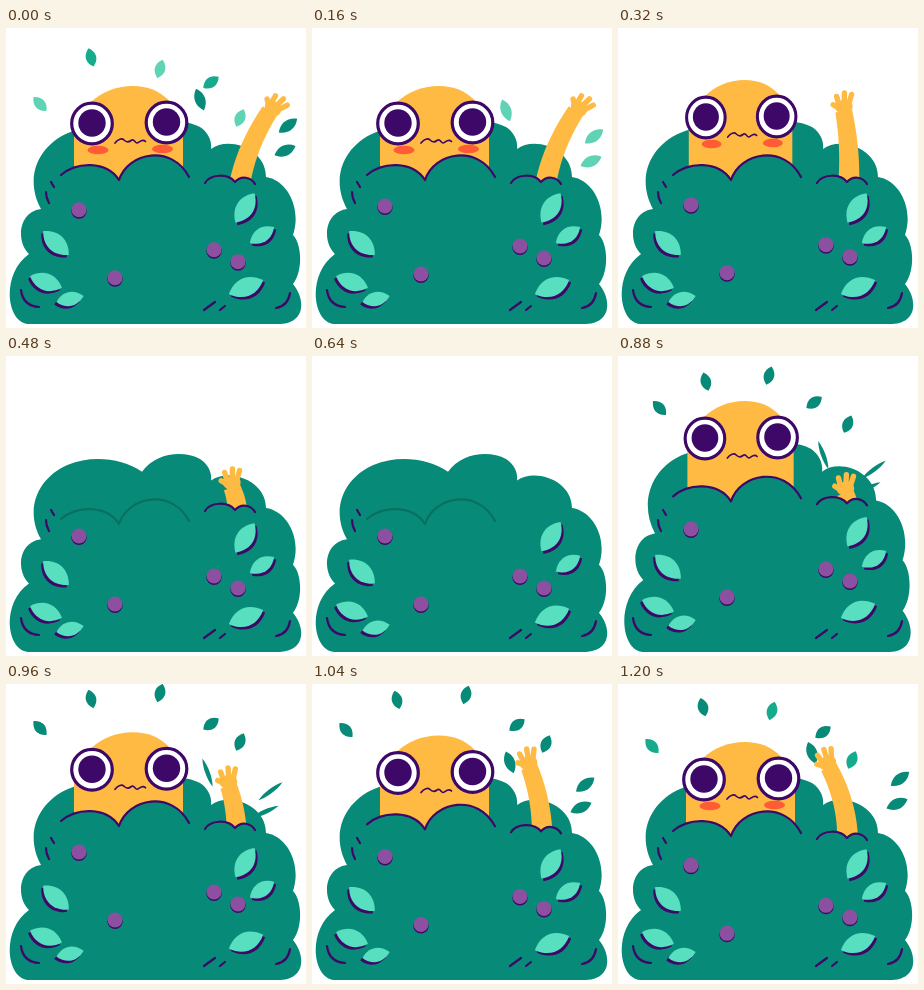
An HTML page that plays this animation: 300x300 px, repeating every 1.28 s.

```html
<!DOCTYPE html>
<html lang="en">
<head>
<meta charset="utf-8">
<title>Peeking from the bush</title>
<style>
html, body { margin: 0; width: 100%; height: 100%; overflow: hidden; background: #fff; }
svg { display: block; width: 100vw; height: 100vh; }
.line { fill: none; stroke: #3d0868; stroke-width: 2.2; stroke-linecap: round; stroke-linejoin: round; }
.green { fill: #088a78; }
.skin { fill: #ffba43; }
.finger { fill: none; stroke: #ffba43; stroke-width: 5.4; stroke-linecap: round; }
</style>
</head>
<body>
<svg viewBox="0 0 300 300">
  <g id="flying"></g>
  <path id="bush" class="green" d="M35 181C18 150 32 118 62 105C85 95 116 98 136 112C150 92 178 90 194 99C203 105 206 114 205 121C222 108 260 120 260 149C281 152 296 180 287 207C296 216 297 243 287 256C300 272 299 295 274 296H22C0 294 -5 246 23 226C10 214 12 184 35 181Z"/>
  <g id="body">
    <path class="skin" d="M68 215V108C70 84 92 58 127 58C156 58 175 78 177 108V215Z"/>
    <g id="cheeks" fill="#ff5b35">
      <ellipse cx="92" cy="122" rx="10.5" ry="4.3"/>
      <ellipse cx="156.5" cy="121" rx="10.5" ry="4.3"/>
    </g>
    <g id="eyes"></g>
    <path class="line" style="stroke-width:1.7" d="M109 115C112 111 116 110 118 112S122 115 125 112.500S129 115 131 115S136 110 139.500 113.500"/>
  </g>
  <g id="arm">
    <path id="limb" class="skin"/>
    <g id="hand">
      <ellipse class="skin" cx="0.500" cy="-4" rx="8.800" ry="7"/>
      <path class="finger" d="M-3 -2L-10 -7M-4 -5L-6 -15M1 -6L2 -18M5 -5L9 -16"/>
    </g>
  </g>
  <g id="fold">
    <path class="green" d="M55 147C70 134 100 132 113 152C122 124 166 116 183 149V275H55Z"/>
    <path id="foldLine" class="line" d="M55 147C70 134 100 132 113 152C122 124 166 116 183 149"/>
  </g>
  <g id="cuff">
    <path class="green" d="M199 155C204 146 222 145 229 154C235 147 245 149 249 156V275H199Z"/>
    <path id="cuffLine" class="line" d="M199 155C204 146 222 145 229 154C235 147 245 149 249 156"/>
  </g>
  <path class="line" d="M40 164Q40 170 43 175M45 154L48 159M15 262Q17 278 33 279M284 265Q282 278 270 280M198 282L209 274M214 282L219 278"/>
  <g id="leaves"></g>
  <g id="berries"></g>
</svg>
<script>
const STEP = 80, COUNT = 16;
const GREEN = '#088a78', MID = '#16ab8c', MINT = '#58dfbf', INK = '#3d0868';
const $ = id => document.getElementById(id);

function add(parent, tag, attrs) {
  const el = document.createElementNS('http://www.w3.org/2000/svg', tag);
  for (const k in attrs) el.setAttribute(k, attrs[k]);
  return parent.appendChild(el);
}

const place = (id, transform) => $(id).setAttribute('transform', transform);
const shift = (id, dy) => place(id, `translate(0 ${dy})`);
const show = (el, on) => el.setAttribute('visibility', on ? 'visible' : 'hidden');
const scaleAt = (x, y, sx, sy) =>
  `translate(${x} ${y}) scale(${sx} ${sy}) translate(${-x} ${-y})`;

// Triangle pulse of height 1 around a step, and a smooth ramp between two steps.
const pulse = (n, peak, width) => Math.max(0, 1 - Math.abs(n - peak) / width);
function ramp(n, a, b) {
  const k = Math.min(1, Math.max(0, (n - a) / (b - a)));
  return k * k * (3 - 2 * k);
}

function leafPath(len, width) {
  const h = len / 2, c = width * 0.667, m = h * 0.4;
  return `M0 ${-h}C${c} ${-m} ${c} ${m} 0 ${h}C${-c} ${m} ${-c} ${-m} 0 ${-h}Z`;
}

// Resting leaves: x, y, tilt, length
[[239, 180, 33, 35], [256, 207, 57, 29], [240, 259, 68, 37],
 [50, 215, -47, 35], [40, 254, -70, 34], [64, 271, 78, 28]
].forEach(([x, y, tilt, len]) => {
  const d = leafPath(len, len / 2), side = x < 150 ? -2 : 2;
  add($('leaves'), 'path', { d, fill: INK, transform: `translate(${x + side} ${y + 2.5}) rotate(${tilt})` });
  add($('leaves'), 'path', { d, fill: MINT, transform: `translate(${x} ${y}) rotate(${tilt})` });
});

for (const [x, y] of [[86, 95.5], [160.5, 94.5]]) {
  add($('eyes'), 'circle', { cx: x, cy: y, r: 20.3, fill: '#fff', stroke: INK, 'stroke-width': 3.2 });
  add($('eyes'), 'circle', { cx: x, cy: y - 0.5, r: 13.7, fill: INK });
}

for (const [x, y] of [[73, 178], [109, 246], [208, 218], [232, 230]]) {
  add($('berries'), 'circle', { cx: x, cy: y + 1.3, r: 7.7, fill: INK });
  add($('berries'), 'circle', { cx: x, cy: y, r: 7.5, fill: '#8d50a1' });
}

// Tossed leaves: highest x and y, tilt, launch step, end step
const tossed = [
  [85, 15, -15, 9, 18], [154, 9, 16, 9, 17], [34, 44, -43, 9, 17],
  [205, 40, 54, 9, 18], [234, 58, 23, 9, 17],
  [194, 68, -20, 11, 19], [282, 94, 53, 11, 19], [279, 119, 66, 11, 19]
].map(([x, y, tilt, launch, end]) =>
  ({ x, y, tilt, launch, end, el: add($('flying'), 'path', {}) }));

// Shoots out along its tilt, opens, then sinks and pales.
function drawTossed({ x, y, tilt, launch, end, el }, n) {
  const step = n < 4 ? n + COUNT : n, age = step - launch;
  show(el, age >= 0 && step < end);
  const a = tilt * Math.PI / 180;
  const back = 11 * Math.max(0, 3 - age);
  const fall = (end === 17 ? 2 : 0.9) * Math.max(0, age - 3) ** 2;
  const left = end - step;
  el.setAttribute('d', age < 2 ? leafPath(30, 4.5) : leafPath(launch > 9 ? 23 : 19, 10.5));
  el.setAttribute('fill', left === 1 ? '#60d3b5' : left === 2 ? MID : GREEN);
  el.setAttribute('transform',
    `translate(${x - back * Math.sin(a)} ${y + back * Math.cos(a) + fall}) rotate(${tilt})`);
}

// Tapered limb along a quadratic curve.
function limbPath(x0, y0, cx, cy, x1, y1) {
  const left = [], right = [];
  for (let i = 0; i <= 12; i++) {
    const t = i / 12, u = 1 - t;
    const x = u * u * x0 + 2 * u * t * cx + t * t * x1;
    const y = u * u * y0 + 2 * u * t * cy + t * t * y1;
    const a = Math.atan2(u * (cy - y0) + t * (y1 - cy), u * (cx - x0) + t * (x1 - cx));
    const w = 10.8 - 2.3 * t, nx = Math.sin(a) * w, ny = -Math.cos(a) * w;
    left.push(`${x + nx} ${y + ny}`);
    right.unshift(`${x - nx} ${y - ny}`);
  }
  return 'M' + left.concat(right).join('L') + 'Z';
}

function drawArm(n) {
  const ducking = n < 8;
  const tilt = ducking ? 42 - 46 * ramp(n, 2, 4) : -22 * ramp(n, 10, 15);
  const drop = ducking ? 24 * Math.max(0, n - 4) : 19 * Math.max(0, 13 - n) ** 1.5;
  const x = 229 + 0.83 * tilt, y = 83 + drop, base = 230 + 0.05 * tilt;
  show($('arm'), n < 7 || n > 10);
  $('limb').setAttribute('d', limbPath(base, 168, base + 4, Math.max(112, (y + 168) / 2), x, y));
  place('hand', `translate(${x} ${y}) rotate(${tilt})`);
}

function draw(n) {
  const hidden = n < 8 ? ramp(n, 4, 6) : 1 - ramp(n, 8, 10);
  const pop = pulse(n, 10, 2);
  const heave = -10 * pulse(n, 12, 3);

  place('bush', scaleAt(150, 296, 1 - 0.035 * pop, 1 + 0.06 * pop - 0.02 * hidden));
  shift('fold', heave + 16 * hidden);
  shift('cuff', heave);
  shift('leaves', 2 * hidden - 7 * pulse(n, 10, 2.5));

  // Berries jump with the bush, then swing to rest.
  const since = (n + 4) % COUNT;
  const swing = since < 10 ? Math.cos(since * Math.PI / 4) * Math.exp(-since / 4) : pulse(n, 12, 2);
  shift('berries', 2 * hidden - 10 * swing);

  $('foldLine').style.stroke = hidden === 1 ? '#08705f' : INK;
  show($('cuffLine'), n < 8 || n > 10);

  const lift = 115 * hidden - 6 * pulse(n, 4, 2) - 13 * pulse(n, 11, 4);
  const width = 1 - 0.05 * pulse(n, 4, 2) - 0.05 * pop;
  show($('body'), hidden < 1);
  place('body', `translate(0 ${lift}) ` + scaleAt(123.5, 0, width, 1));
  $('cheeks').style.display = n < 6 || n > 13 ? '' : 'none';

  drawArm(n);
  tossed.forEach(leaf => drawTossed(leaf, n));
}

const start = performance.now();
function tick() {
  draw(Math.floor((performance.now() - start) / STEP) % COUNT);
  requestAnimationFrame(tick);
}
tick();
</script>
</body>
</html>
```
